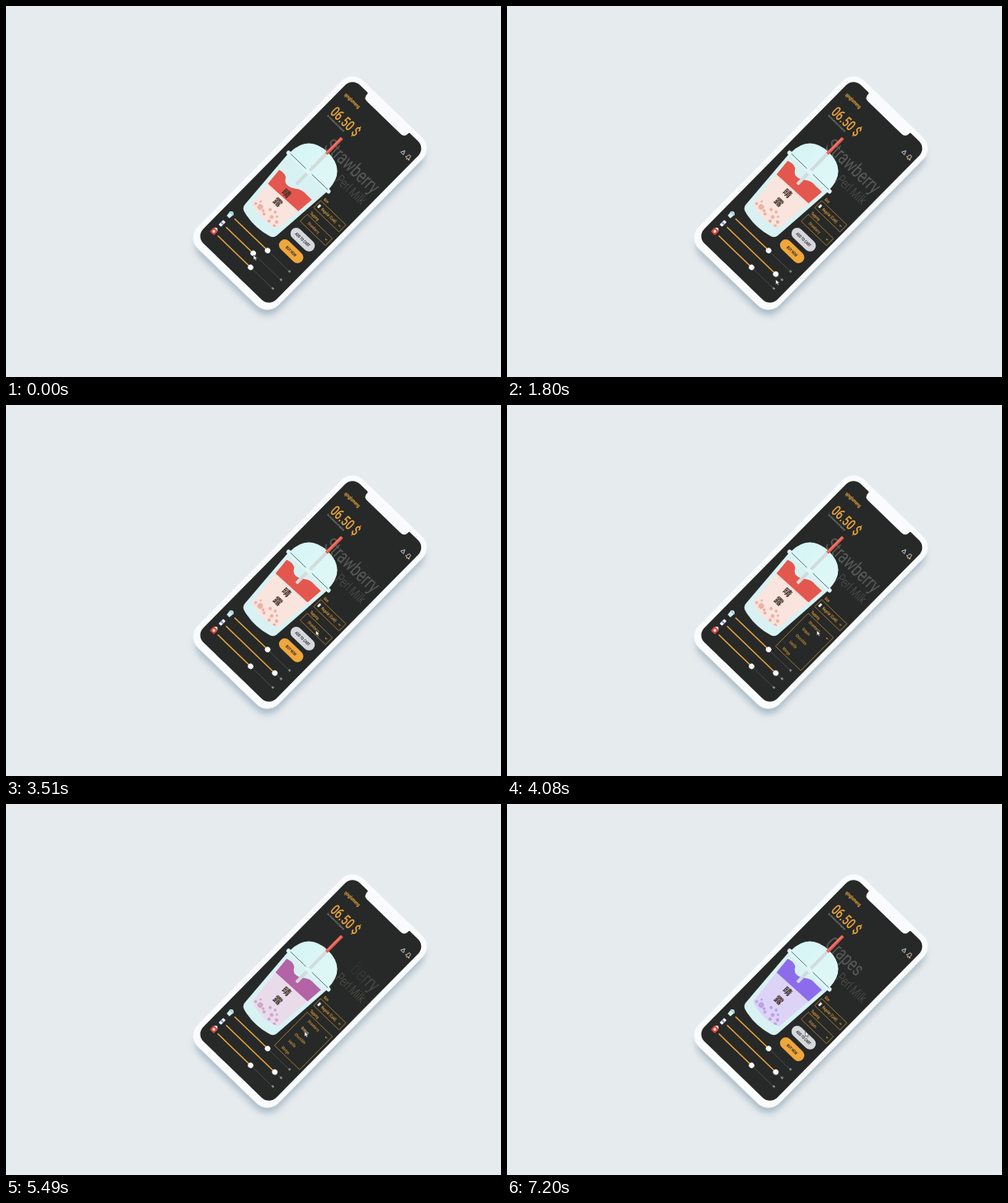
An HTML page for the animation above (7.53 s loop, 600 by 450 pixels).

```html
<!DOCTYPE html>
<html lang="en">
<head>
<meta charset="utf-8">
<title>Bubble tea order</title>
<style>
  html, body { margin: 0; width: 100%; height: 100%; overflow: hidden; background: #e6ebee; }
  svg { display: block; width: 600px; height: 450px; }
  text { font-family: Roboto, "Liberation Sans", sans-serif; }
  .han { font-family: "Noto Sans CJK TC", "Noto Sans CJK", "Noto Sans CJK SC", sans-serif; font-weight: 700; }
</style>
</head>
<body>
<svg id="stage" viewBox="0 0 600 450">
  <defs>
    <filter id="soft" x="-20%" y="-20%" width="140%" height="140%"><feGaussianBlur stdDeviation="4.5"/></filter>
    <clipPath id="inner"><path d="M20.5 132 L27 201 Q49 210 71 201 L77 132Z"/></clipPath>
    <clipPath id="menuClip"><rect id="menuMask" x="84" y="164" width="42.5" height="12"/></clipPath>
    <linearGradient id="dome" x1="0" x2="1"><stop offset="0" stop-color="#d6f5f5"/><stop offset="1" stop-color="#e0f8f7"/></linearGradient>
  </defs>
  <rect width="600" height="450" fill="#e6ebee"/>
  <g transform="matrix(.72 .694 -.702 .712 419.7 86.5)">
    <rect x="3" y="3" width="131" height="281" rx="18" fill="#9fb1bf" opacity=".9" filter="url(#soft)"/>
  </g>
  <g id="phone" transform="matrix(.72 .694 -.702 .712 419.7 77.5)"></g>
  <path id="cursor" d="M0 0 L0 6 L1.5 4.8 L2.6 7 L3.7 6.5 L2.7 4.4 L4.5 4.2Z" fill="#fff" stroke="#222" stroke-width=".5"/>
</svg>
<script>
const LOOP = 7530, CONDENSE = 0.7;
const GOLD = '#efa63b', DARK = '#262928', PALE = '#d8f2f3';
const phone = document.getElementById('phone');

function add(tag, attrs, parent = phone) {
  const el = document.createElementNS('http://www.w3.org/2000/svg', tag);
  set(el, attrs);
  parent.appendChild(el);
  return el;
}
function set(el, attrs) {
  for (const k in attrs) el.setAttribute(k, attrs[k]);
}
function rect(x, y, width, height, fill, more, parent) {
  return add('rect', { x, y, width, height, fill, ...more }, parent);
}
function path(d, fill, more, parent) {
  return add('path', { d, fill, ...more }, parent);
}
function dot(cx, cy, r, fill, parent) {
  return add('circle', { cx, cy, r, ...(fill && { fill }) }, parent);
}
// Condensed label with its baseline at y
function label(str, x, y, size, fill, more, parent) {
  const el = add('text', {
    transform: `translate(${x} ${y}) scale(${CONDENSE} 1)`, 'font-size': size, fill, ...more
  }, parent);
  el.textContent = str;
  return el;
}
const medium = { 'font-weight': 500 };
const bold = { 'font-weight': 700 };
const centred = { 'font-weight': 700, 'text-anchor': 'middle' };

// Body, screen and notch
rect(0, 0, 136.5, 286, '#fafbfd', { rx: 18.5, stroke: '#e9edf2', 'stroke-width': .8 });
rect(6.8, 6.8, 123.2, 270, DARK, { rx: 12.5 });
path('M30 5 Q33.5 6 33.5 9 Q33.5 15.2 40 15.2 H96 Q102.5 15.2 102.5 9 Q102.5 6 106 5Z', '#fafbfd');

// Header
label('qinglumeng', 14.5, 29, 6.4, GOLD, bold);
label('06.50 $', 17, 57, 18, GOLD, medium);
label('Tax included with all toppings', 17, 61.6, 3.1, '#d6d3cd');
path('M114.2 26.4 L116.5 31 H111.9Z', 'none', { stroke: '#e8e8e8', 'stroke-width': .8 });
path('M120 31 Q121 30 121 28.5 Q121 26 122.8 26 Q124.6 26 124.6 28.5 Q124.6 30 125.6 31Z M122 32.2H123.6',
  'none', { stroke: '#e8e8e8', 'stroke-width': .8 });
dot(125, 30.8, 1.1, GOLD);

// Titles
function word(str) {
  const el = label('', 41, 92.5, 24.5, '#575a58');
  const letters = [...str].map(ch => {
    const s = add('tspan', {}, el);
    s.textContent = ch;
    return s;
  });
  return { el, letters };
}
const berry = word('Strawberry'), grape = word('Grapes');
const sub = label('Perl Milk', 79.3, 111.5, 16.5, '#515452', { 'font-weight': 300 });

// Cup
path('M16 127 L22 208 Q22.5 213 27 214.5 Q49 221 71 214.5 Q75.5 213 76 208 L82 127Z', PALE);
const liquid = add('g', { 'clip-path': 'url(#inner)' });
const milk = rect(15, 150, 65, 65, '#fae4de', {}, liquid);
const band = path('', '#e4574e', {}, liquid);
const pearls = add('g', { opacity: .9 }, liquid);
[[30.5, 198, 1.8], [37.3, 197.2, 3.4], [43, 198, 1.7], [48, 191, 2], [54.5, 189, 1.8], [55.7, 196.3, 2.2],
 [64.2, 196.5, 2.1], [57, 202, 2], [65.6, 202, 2], [46.5, 200, 1.9], [60, 191.5, 1.5], [33, 192, 1.4]]
  .forEach(([x, y, r]) => dot(x, y, r, '', pearls));
['晴', '露'].forEach((ch, i) => {
  const el = add('text', { class: 'han', x: 48.3, y: 167 + i * 15, 'font-size': 10.5, 'text-anchor': 'middle', fill: '#3b2d24' });
  el.textContent = ch;
});
path('M16.5 125 Q17 93 49 92.5 Q81 93 81.5 125Z', 'url(#dome)');
rect(47.1, 94, 4, 53, '#d2dbdc', { rx: 1 });
rect(47.1, 68, 4, 27, '#e2574c', { rx: .8 });
rect(48, 69, 1, 25, '#f08a7c');
rect(13, 123.5, 72.5, 5.2, '#dff6f6', { rx: 2.4 });
path('M18 125.2 H44 M54 125.2 H81', 'none', { stroke: '#3f5d60', 'stroke-width': .8 });

// Order buttons
function pill(str, y, fill) {
  rect(84, y - 7, 35.5, 14, fill, { rx: 7 });
  label(str, 101.7, y + 1.9, 5.2, '#2b2b2b', centred);
}
pill('ADD TO CART', 190, '#d6d8de');
pill('BUY NOW', 209.8, GOLD);

// Selects
const outline = { stroke: '#b9812f', 'stroke-width': .8 };
const chevron = y => path(`M120.5 ${y} l1.3 1.4 l1.3 -1.4`, 'none', { stroke: GOLD, 'stroke-width': .7 });
label('Size', 85.5, 137.8, 5.2, GOLD, medium);
rect(84, 140.7, 42.5, 12, DARK, outline);
rect(86.2, 144.6, 2.8, 4.8, '#f2f2f2', { rx: .8 });
label('Regular (Cold)', 92, 148.6, 5.3, GOLD, medium);
chevron(146.2);
label('Topping', 85.5, 161.3, 5.2, GOLD, medium);
const menu = rect(84, 164, 42.5, 12, DARK, outline);
const menuMask = document.getElementById('menuMask');
const list = add('g', { 'clip-path': 'url(#menuClip)' });
const rows = ['Strawberry', 'Grapes', 'Chocolate', 'Vanilla', 'Mango']
  .map((str, i) => label(str, 92, 172.2 + i * 11.2, 5.3, '#d2943a', medium, list));
chevron(169.5);

// Sliders
function slider(y, value, unit) {
  path(`M25 ${y}H116`, 'none', { stroke: '#515553', 'stroke-width': .7 });
  const line = path('', 'none', { stroke: GOLD, 'stroke-width': 1.4 });
  const knob = dot(0, y, 3.3, '#fff');
  label(unit, 116, y + 1, 3.6, '#e6e6e6', bold);
  const move = x => {
    set(line, { d: `M25 ${y}H${x}` });
    set(knob, { cx: x });
  };
  move(value);
  return move;
}
slider(229, 80.8, '60');
const moveMilk = slider(243.5, 70.7, '80');
slider(258, 80.4, '60');
// Ingredient icons
path('M15 226.5 Q18 222.5 21 226.5 L20.2 233 H15.8Z', '#cfeeee');
rect(14.6, 226.3, 6.8, 1, '#8fb8b8');
rect(16.4, 239.5, 4, 8, '#f3f5fb', { rx: .8 });
rect(16.4, 242.5, 4, 2, '#7d92c9');
rect(14.5, 254, 7, 7, '#d9473f', { rx: 1.6 });
dot(18, 257.5, 1.7, '#f6d8d0');
path('M15 254 L18 251.5 L21 254Z', '#f3ece6');

// Timing
const clamp = p => Math.max(0, Math.min(1, p));
const span = (t, a, b) => clamp((t - a) / (b - a));
const ease = p => (1 - Math.cos(Math.PI * p)) / 2;
const glide = (t, a, b) => ease(span(t, a, b));
const mix = (a, b, p) => a + (b - a) * p;
function blend(a, b, p) {
  return `rgb(${a.map((v, i) => Math.round(mix(v, b[i], p)))})`;
}

const DRAG = [200, 1650];
// Time, x, y of each rest point
const cursorKeys = [
  [0, 300, 302], [DRAG[0], 300, 302], [DRAG[1], 325.5, 332], [1750, 325.5, 332], [2900, 375.5, 273.5],
  [4100, 375.5, 273.5], [4650, 362.5, 278], [5200, 362.5, 278], [5700, 361.5, 275], [6330, 361.5, 275],
  [6810, 361.5, 276], [LOOP, 361.5, 276]
];
function cursorAt(t) {
  const i = cursorKeys.findIndex((k, n) => n && t <= k[0]);
  const a = cursorKeys[i - 1], b = cursorKeys[i];
  const p = glide(t, a[0], b[0]);
  return [mix(a[1], b[1], p), mix(a[2], b[2], p)];
}

const cursor = document.getElementById('cursor');

function drawCup(knob, hue) {
  const top = 149.5 - .4 * (knob - 70.7), low = top + 20;
  set(band, {
    d: `M18 ${top + 1} Q27 ${top - 4} 34 ${top} Q37 ${top + 6} 42 ${top + 6}
        Q47 ${top + 6} 52 ${top + 2} Q58 ${top - 3} 66 ${top - 2} L80 ${top - 2} V${low - 1} L18 ${low + 1}Z`,
    fill: blend([228, 87, 78], [141, 108, 236], hue)
  });
  set(milk, { y: low - 4, fill: blend([250, 228, 222], [221, 211, 246], hue) });
  set(pearls, { fill: blend([233, 172, 160], [181, 157, 228], hue) });
}

function drawTitle(t) {
  berry.letters.forEach((el, i) => set(el, { 'fill-opacity': 1 - span(t, 5200 + i * 25, 5400 + i * 25) }));
  grape.letters.forEach((el, i) => set(el, { 'fill-opacity': glide(t, 5580 + i * 30, 6060 + i * 30) }));
  const tint = span(t, 5450, 5700) * (1 - span(t, 5880, 6300));
  set(grape.el, { fill: blend([87, 90, 88], [112, 88, 56], tint) });
  set(sub, { fill: blend([81, 84, 82], [118, 90, 54], tint) });
}

function drawMenu(t) {
  const open = glide(t, 3600, 4100) - glide(t, 5520, 6350);
  const height = mix(12, 56.5, open);
  set(menu, { height });
  set(menuMask, { height });
  rows[0].textContent = t < 6000 ? 'Strawberry' : 'Grapes';
  set(rows[1], { fill: t > 4600 && t < 6000 ? '#f3c274' : '#d2943a' });
}

function render(t) {
  const knob = mix(70.7, 107, glide(t, ...DRAG));
  moveMilk(knob);
  drawCup(knob, glide(t, 5250, 5700));
  drawTitle(t);
  drawMenu(t);
  const [x, y] = cursorAt(t);
  const press = t >= 7110 && t < 7200 ? .85 : 1;
  set(cursor, { transform: `translate(${x} ${y}) scale(${press})` });
}

const start = performance.now();
function tick() {
  render((performance.now() - start) % LOOP);
  requestAnimationFrame(tick);
}
render(0);
requestAnimationFrame(tick);
</script>
</body>
</html>
```
